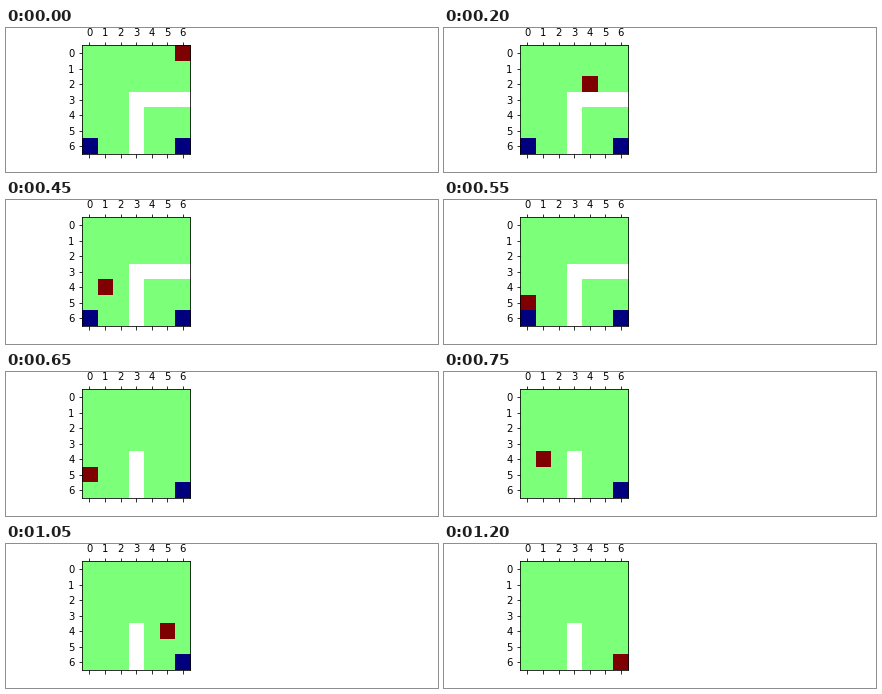
Recreate the animation shown at these times as a matplotlib script. Size 432 px wide and 144 px high, loop 1.25 s.

```python
import numpy as np
import matplotlib.pyplot as plt
from matplotlib.animation import FuncAnimation

SIZE = 7
START = (0, 6)
GOALS = [(6, 0), (6, 6)]
MOVES = "DLDLLLDLDLDD" + "URURURRDRDRD"
STEP = {"U": (-1, 0), "D": (1, 0), "L": (0, -1), "R": (0, 1)}
FIRST_LEG = 12
FRAME_MS = 50


def walk(start, moves):
    path = [start]
    for move in moves:
        row, col = path[-1]
        dr, dc = STEP[move]
        path.append((row + dr, col + dc))
    return path


PATH = walk(START, MOVES)


def grid_at(i):
    """Free cells are 0, goals -1, the agent 1, walls masked."""
    grid = np.zeros((SIZE, SIZE))
    second_leg = i >= FIRST_LEG
    grid[4:, 3] = np.nan
    if not second_leg:
        grid[3, 3:] = np.nan
    for goal in GOALS[second_leg:]:
        grid[goal] = -1
    grid[PATH[i]] = 1
    return np.ma.masked_invalid(grid)


plt.rcParams["font.family"] = "DejaVu Sans"
fig = plt.figure(figsize=(6, 2), dpi=72, facecolor="white")
fig.subplots_adjust(left=0.125, right=0.9, bottom=0.125, top=0.88, wspace=0.2)
ax = fig.add_subplot(1, 2, 1)
image = ax.matshow(grid_at(0), cmap="jet", vmin=-1, vmax=1)
ax.set_xticks(range(SIZE))
ax.set_yticks(range(SIZE))


def update(i):
    image.set_data(grid_at(i))
    return (image,)


anim = FuncAnimation(fig, update, frames=len(PATH), interval=FRAME_MS,
                     repeat=True, repeat_delay=0)
plt.show()
```
